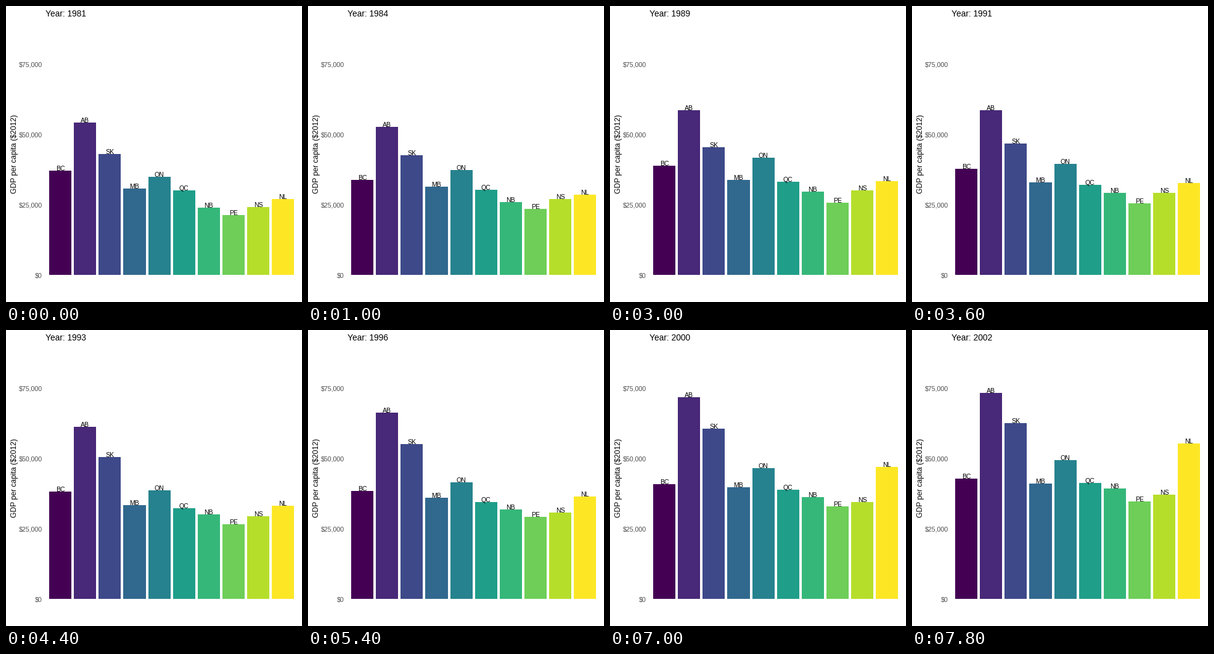
Animation, 480 px wide and 480 px high, one loop 8000 ms. Source, as a matplotlib script:

```python
import numpy as np
import matplotlib.pyplot as plt
from matplotlib.animation import FuncAnimation
from matplotlib.patches import Rectangle

SIZE, DPI = 480, 100
FRAMES, INTERVAL = 40, 200
START_YEAR, YEARS_PER_FRAME = 1981, 38 / 69
BASE_Y, PX_PER_K = 436.3, 4.56
FIRST_X, PITCH, BAR_W = 88.1, 40.13, 36.1

plt.rcParams["font.family"] = "Liberation Sans"

# GDP per capita in thousands of dollars at a few key times (seconds)
KEY_TIMES = [0, 1, 2, 3, 4.4, 6.2, 7.8]
GDP = {
    "BC": [37.1, 33.8, 36.7, 38.9, 38.2, 38.7, 42.8],
    "AB": [54.2, 52.7, 54.5, 58.6, 61.2, 70.2, 73.3],
    "SK": [43.0, 42.6, 45.7, 45.5, 50.5, 58.8, 62.6],
    "MB": [30.8, 31.4, 33.2, 33.8, 33.4, 38.2, 41.1],
    "ON": [34.9, 37.3, 40.0, 41.7, 38.7, 43.9, 49.4],
    "QC": [30.1, 30.3, 32.1, 33.2, 32.3, 36.3, 41.3],
    "NB": [24.0, 25.9, 29.2, 29.7, 30.1, 33.4, 39.3],
    "PE": [21.3, 23.5, 24.4, 25.7, 26.6, 31.4, 34.7],
    "NS": [24.2, 27.0, 29.0, 30.1, 29.5, 31.9, 37.1],
    "NL": [27.0, 28.6, 30.1, 33.4, 33.2, 38.9, 55.3],
}

fig = plt.figure(figsize=(SIZE / DPI, SIZE / DPI), dpi=DPI, facecolor="white")
ax = fig.add_axes([0, 0, 1, 1])
ax.set_xlim(0, SIZE)
ax.set_ylim(SIZE, 0)
ax.axis("off")


def put_text(x, y, s, px, **kw):
    return ax.text(x, y, s, fontsize=px * 72 / DPI, va="baseline", **kw)


def recession(t):
    """Share lost by every province in the two downturns."""
    return np.interp(t, [0, 0.4, 1, 3, 3.6, 4.4], [0, 0.03, 0, 0, 0.02, 0])


title = put_text(64, 17, "", 13.7, color="black")
put_text(17, 239.7, r"GDP per capita (\$2012)", 12.15, color="black",
         ha="center", rotation=90, rotation_mode="anchor")
for k in (0, 25, 50, 75):
    put_text(58.6, BASE_Y + 4.4 - k * PX_PER_K, rf"\${k * 1000:,}", 10.6,
             color="#4D4D4D", ha="right")

bars, labels = [], []
colors = plt.cm.viridis(np.linspace(0, 1, len(GDP)))
for i, (name, color) in enumerate(zip(GDP, colors)):
    x = FIRST_X + i * PITCH
    bar = Rectangle((x - BAR_W / 2, BASE_Y), BAR_W, 0, facecolor=color, linewidth=0)
    bars.append(ax.add_patch(bar))
    labels.append(put_text(x, BASE_Y, name, 10.5, color="black", ha="center", zorder=3))


def update(frame):
    t = frame * INTERVAL / 1000
    title.set_text(f"Year: {round(START_YEAR + frame * YEARS_PER_FRAME)}")
    scale = PX_PER_K * (1 - recession(t))
    for bar, label, values in zip(bars, labels, GDP.values()):
        height = np.interp(t, KEY_TIMES, values) * scale
        bar.set_height(-height)
        label.set_y(BASE_Y - height)
    return [title, *bars, *labels]


anim = FuncAnimation(fig, update, frames=FRAMES, interval=INTERVAL,
                     repeat=True, repeat_delay=0)
plt.show()
```
